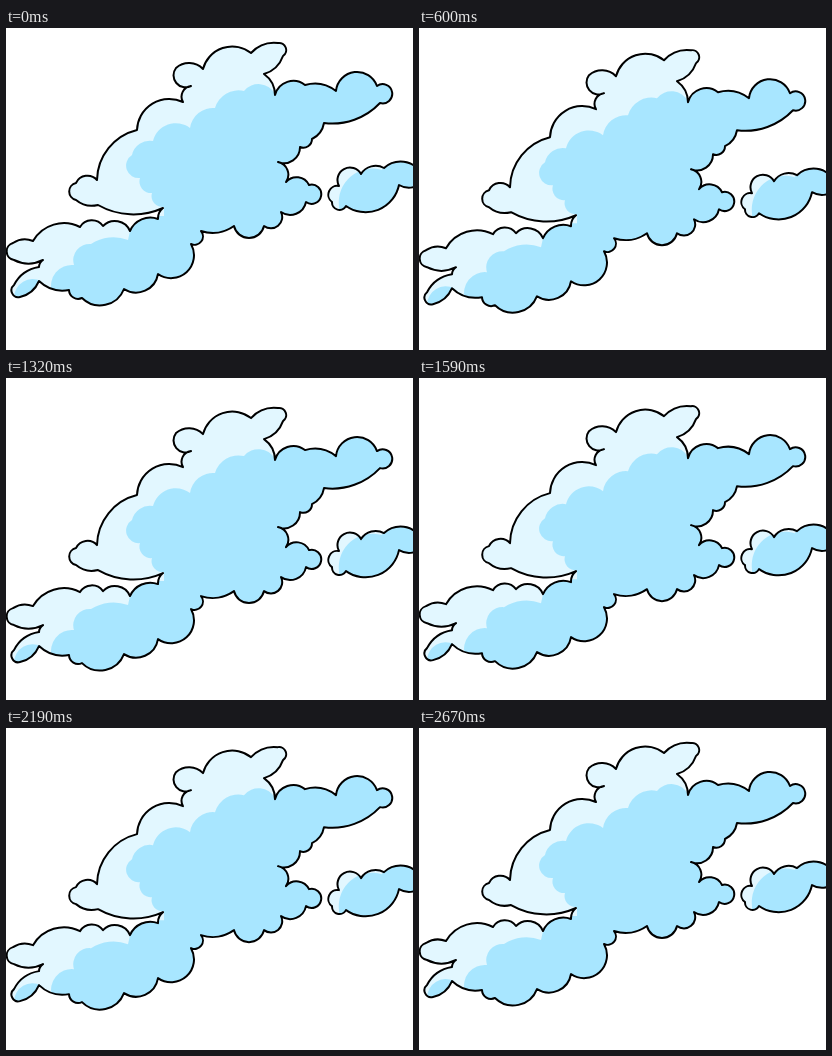
Write an HTML page with a canvas that moves like this. It is 407 px wide and 322 px high and loops after 2700 ms.

```html
<!DOCTYPE html>
<html lang="en">
<head>
<meta charset="utf-8">
<title>Drifting clouds</title>
<style>
  html, body { margin: 0; width: 100%; height: 100%; overflow: hidden; background: #fff; }
  canvas { display: block; }
</style>
</head>
<body>
<canvas id="sky" width="407" height="322"></canvas>
<script>
const ctx = document.getElementById('sky').getContext('2d');
const LOOP = 2700, STEP = 30, RISE_END = 1240, DRIFT = 15.2;
const BLUE = '#a8e6ff', LIGHT = '#e2f7ff';

// How far a puff swells, as a share of the distance between its two ends.
const PUFF = 0.27, FLAT = 0.12, KNOB = 0.8, ROUND = 0.4;

// Builds a closed path of circular puffs through the given [x, y, swell] creases.
// side is 1 for puffs that swell outwards on a clockwise path, 0 for the reverse.
function puffs([[px, py], ...creases], side = 1) {
  let d = `M${px} ${py}`;
  for (const [x, y, swell = PUFF] of creases) {
    const r = Math.hypot(x - px, y - py) * (1 + 4 * swell ** 2) / (8 * swell);
    d += `A${r} ${r} 0 ${swell > 0.5 ? 1 : 0} ${side} ${x} ${y}`;
    [px, py] = [x, y];
  }
  return d;
}

// The sunlit part lies between a puffy edge and a corner outside the outline.
const makeCloud = (outline, ...sunlit) => ({
  outline: new Path2D(puffs(outline) + 'Z'),
  light: new Path2D(sunlit.map(([edge, corner]) => puffs(edge, 0) + corner + 'Z').join(''))
});

const crown = [
  [91, 152], [131, 102, 0.17], [177, 74], [185, 58],
  [170, 40, ROUND], [197, 41, 0.2], [245, 25],
  [272, 15, FLAT], [277, 28, ROUND], [258, 46, FLAT], [269, 67, FLAT],
  [299, 57], [330, 63, FLAT], [371, 58, ROUND], [374, 75, KNOB],
  [318, 95, FLAT], [306, 111, FLAT], [294, 119], [272, 134]
];
const belly = [
  [280, 154], [303, 157], [300, 174, KNOB], [275, 184], [258, 198, ROUND],
  [228, 198, ROUND], [195, 203, FLAT], [185, 216, ROUND], [152, 246, ROUND],
  [118, 261], [76, 270], [63, 262], [33, 253, FLAT]
];
const tail = [
  [14, 269, FLAT], [8, 257, ROUND], [33, 239, FLAT], [37, 232, FLAT],
  [8, 232, FLAT], [7, 215, ROUND], [27, 213, FLAT], [74, 199, 0.2],
  [97, 198], [124, 203], [152, 191, 0.2], [157, 180, FLAT],
  [92, 177, FLAT], [70, 172, FLAT], [70, 155, ROUND], [91, 152]
];
const crownEdge = [
  [269, 66], [238, 63], [209, 80, 0.2], [184, 100, 0.2], [147, 113],
  [126, 127, 0.2], [134, 150, ROUND], [146, 165], [158, 179]
];
const tailEdge = [[122, 212], [85, 216, FLAT], [68, 237], [46, 264]];
const tipEdge = [[35, 253], [8, 269]];

const islet = [
  [333, 158], [355, 146, 0.5], [378, 140, 0.2], [411, 140, 0.2], [411, 158, FLAT],
  [393, 157, FLAT], [340, 178], [326, 174, ROUND], [333, 158, ROUND]
];
const isletEdge = [[376, 142], [333, 178]];

const clouds = [
  makeCloud([...crown, ...belly, ...tail],
    [crownEdge, 'V188H55V5H285'],
    [tailEdge, 'H35V188H124V203'],
    [tipEdge, 'H0V188H36']),
  makeCloud(islet, [isletEdge, 'V184H315V130H380'])
];

function drawCloud({ outline, light }) {
  ctx.fillStyle = BLUE;
  ctx.fill(outline);
  ctx.save();
  ctx.clip(outline);
  ctx.fillStyle = LIGHT;
  ctx.fill(light);
  ctx.restore();
  ctx.stroke(outline);
}

// Sinks a little faster than it climbs back.
function driftAt(t) {
  const u = t < RISE_END ? t / RISE_END : (LOOP - t) / (LOOP - RISE_END);
  return DRIFT * (1 - Math.cos(Math.PI * u)) / 2;
}

function draw(now) {
  const t = Math.floor((now % LOOP) / STEP) * STEP;
  ctx.setTransform(1, 0, 0, 1, 0, 0);
  ctx.fillStyle = '#fff';
  ctx.fillRect(0, 0, 407, 322);
  ctx.translate(0, driftAt(t));
  ctx.lineWidth = 2;
  ctx.lineJoin = 'round';
  clouds.forEach(drawCloud);
}

const startTime = performance.now();
function frame() {
  draw(performance.now() - startTime);
  requestAnimationFrame(frame);
}
frame();
</script>
</body>
</html>
```
